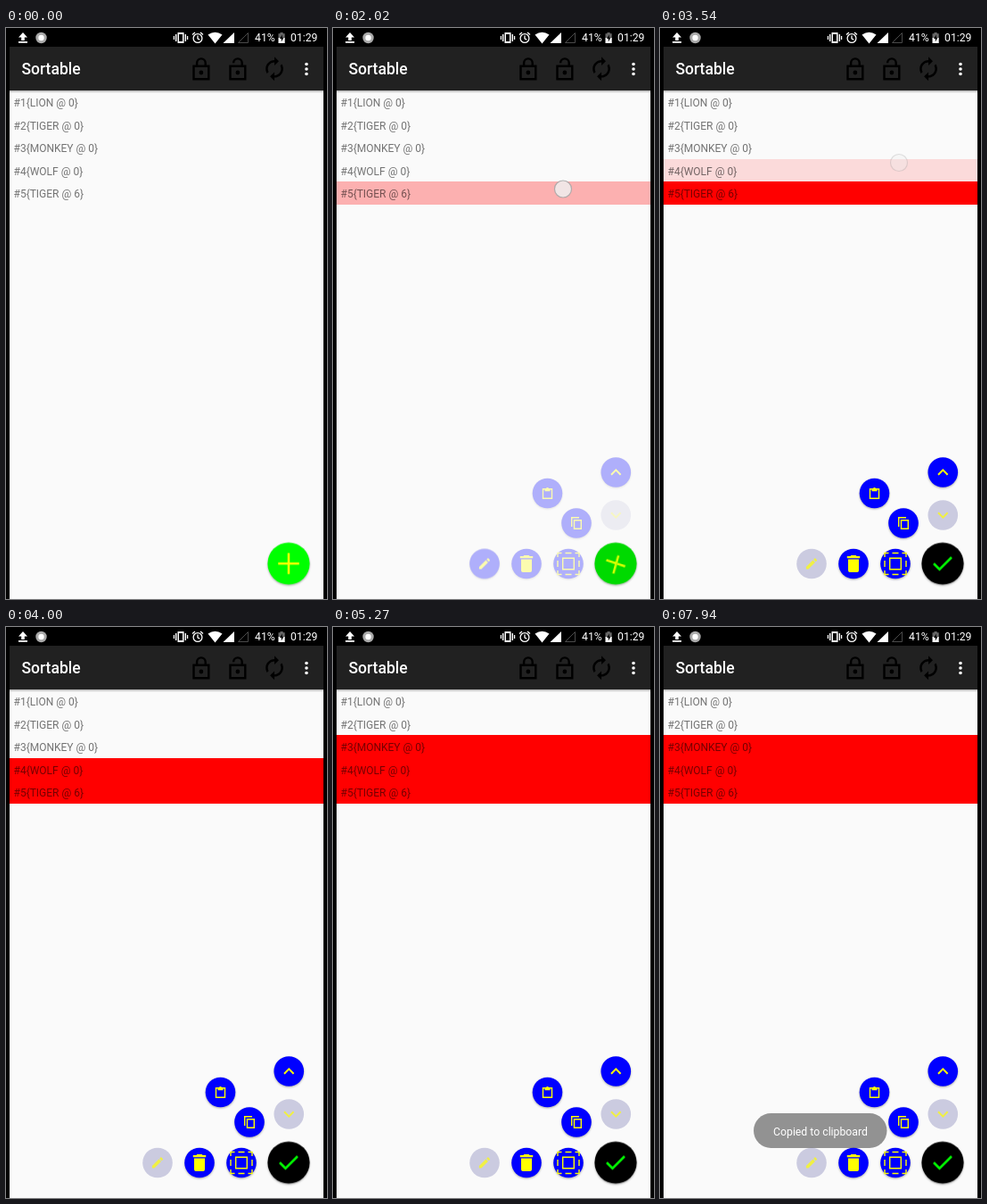
Recreate the animation shown at these times as an HTML page. Size 360x640 px, loop 8 s.

```html
<!DOCTYPE html>
<html lang="en">
<head>
<meta charset="utf-8">
<title>Sortable list</title>
<style>
html, body { margin: 0; width: 100%; height: 100%; overflow: hidden; background: #000; }
svg { display: block; width: 360px; height: 640px; font-family: Roboto, "Noto Sans", sans-serif; }
.anim { animation: 8s cubic-bezier(.37, 0, .63, 1) infinite both; }
.linear { animation-timing-function: linear; }
.label { font-size: 12px; fill: rgba(0, 0, 0, .54); }
.status { font-size: 12.25px; fill: #fff; }
.icon { fill: #ff0; }
.line { fill: none; stroke: #ff0; stroke-width: 2; }
.line.thin { stroke-width: 1.4; }
.off { fill: #cbcbe0; }
.button { fill: #00f; }
.raised { filter: drop-shadow(0 1px 1px rgba(0, 0, 0, .32)); }
.touch { fill: rgba(238, 238, 238, .85); stroke: rgba(165, 165, 165, .85); stroke-width: 1.2; }

/* 1% = 80 ms */
#row5 { animation-name: row5; }
#row4 { animation-name: row4; }
#row3 { animation-name: row3; }
@keyframes row5 { 0%, 21.75% { opacity: 0 } 31.25%, 100% { opacity: 1 } }
@keyframes row4 { 0%, 42.5% { opacity: 0 } 50%, 100% { opacity: 1 } }
@keyframes row3 { 0%, 55% { opacity: 0 } 63.9%, 100% { opacity: 1 } }

#menu { animation-name: row5; }
#edit { animation-name: edit; }
@keyframes edit { 0%, 42.5% { opacity: 1 } 43.75%, 100% { opacity: 0 } }

#fab { animation-name: fab; }
#turn { animation-name: turn; }
#glyph { animation-name: glyph; fill: none; }
@keyframes fab { 0%, 21.75% { fill: #0f0 } 35.75%, 100% { fill: #000 } }
@keyframes turn { 0%, 21.75% { transform: rotate(-90deg) } 35.75%, 100% { transform: rotate(0deg) } }
@keyframes glyph {
  0%, 21.75% { d: path("M-11.7 0L11.7 0M0 11.7L0 -11.7"); stroke: #ff0; stroke-width: 2.5px }
  35.75%, 100% { d: path("M-10 0L-3.5 6.5M-4.4 7.4L10 -7"); stroke: #0f0; stroke-width: 2.7px }
}

#hold { animation-name: hold; }
#tap4 { animation-name: tap4; }
#tap3 { animation-name: tap3; }
#tapCopy { animation-name: tapCopy; }
#ripple { animation-name: ripple; }
@keyframes hold { 0%, 13.74% { opacity: 0 } 13.75%, 31.25% { opacity: 1 } 33.5%, 100% { opacity: 0 } }
@keyframes tap4 { 0%, 42.49% { opacity: 0 } 42.5%, 43.5% { opacity: 1 } 44.75%, 100% { opacity: 0 } }
@keyframes tap3 { 0%, 53.86% { opacity: 0 } 53.87%, 55% { opacity: 1 } 56.5%, 100% { opacity: 0 } }
@keyframes tapCopy { 0%, 86.36% { opacity: 0 } 86.37%, 88.5% { opacity: 1 } 90.5%, 100% { opacity: 0 } }
@keyframes ripple {
  0%, 86.37% { opacity: 0; transform: scale(.3) }
  88.5% { opacity: .25; transform: scale(1) }
  95.75%, 100% { opacity: 0; transform: scale(1) }
}
#toast { animation-name: toast; }
@keyframes toast { 0%, 96.75% { opacity: 0 } 99.25%, 100% { opacity: 1 } }
</style>
</head>
<body>
<svg viewBox="0 0 360 640">
  <defs>
    <linearGradient id="shade" x2="0" y2="1">
      <stop stop-opacity=".3"/><stop offset="1" stop-opacity="0"/>
    </linearGradient>
    <path id="pencil" d="M3 17.2V21h3.8L17.8 9.9l-3.7-3.7zM20.7 7a1 1 0 0 0 0-1.4l-2.3-2.3a1 1 0 0 0-1.4 0l-1.8 1.8 3.7 3.7z"/>
    <path id="body" d="M5 9H19V21H5Z"/>
    <path id="side" d="M-12-7.500V-12H-7.500M-3.500-12H3.500"/>
  </defs>

  <rect x="4" y="21" width="352" height="619" fill="#fafafa"/>
  <rect x="4" y="21" width="352" height="49" fill="#212121"/>
  <rect x="4" y="70" width="352" height="3" fill="url(#shade)"/>

  <!-- status bar -->
  <g fill="#fff">
    <path d="M19 5l5 5.500h-3.200V14h-3.600v-3.500H14zM14 15h10v1.800H14z"/>
    <circle cx="39.500" cy="11" r="6.200" fill="#aaa"/>
    <circle cx="39.500" cy="11" r="3.200"/>
    <path d="M192.500 5h7v12h-7zM190 7h1.400v8H190zM200.600 7h1.400v8h-1.400zM187.800 9h1.300v4h-1.300zM202.900 9h1.300v4h-1.300z"/>
    <rect x="194" y="7" width="4" height="8" fill="#000"/>
    <path d="M234.500 17.500L226.500 7.500Q234.500 2 242.500 7.500zM256 5v12h-12.500z"/>
    <path d="M271.500 5.500v11h-11z" fill="none" stroke="#4a4a4a"/>
    <path d="M305.500 6.200h2V5h3.200v1.200h2V11h-7.200z" fill="#666"/>
    <path d="M305.500 11h7.200v6h-7.200z"/>
    <path d="M309.800 7.500l-2.800 4.500h1.800v3.500l2.700-4.700h-1.700z" fill="#000"/>
  </g>
  <g fill="none" stroke="#fff" stroke-width="1.300">
    <circle cx="215" cy="11.500" r="4.900"/>
    <path d="M215 8.500v3.300l2.300 1.400M209 7.600l3-2.600M221 7.600l-3-2.600"/>
  </g>
  <text class="status" x="279" y="15">41%</text>
  <text class="status" x="319" y="15">01:29</text>

  <!-- toolbar -->
  <text x="17.500" y="52" font-size="17.500" font-weight="500" fill="#fff">Sortable</text>
  <g fill="none" stroke="#000" stroke-width="2">
    <g transform="translate(204.500 32) scale(1.2)">
      <use href="#body"/><path d="M8 9V6a4 4 0 0 1 8 0V9"/><circle cx="12" cy="15" r="1"/>
    </g>
    <g transform="translate(245.500 32) scale(1.2)">
      <use href="#body"/><path d="M8 6a4 4 0 0 1 8 0V9"/><circle cx="12" cy="15" r="1"/>
    </g>
  </g>
  <path transform="translate(286.300 31) scale(1.23)" d="M12 6v3l4-4-4-4v3c-4.400 0-8 3.600-8 8 0 1.600.5 3 1.200 4.300l1.500-1.500c-.5-.8-.7-1.800-.7-2.800 0-3.300 2.700-6 6-6zm6.800 1.700l-1.500 1.500c.4.800.7 1.800.7 2.800 0 3.300-2.700 6-6 6v-3l-4 4 4 4v-3c4.400 0 8-3.600 8-8 0-1.600-.5-3-1.200-4.300z"/>
  <g fill="#fff">
    <circle cx="337" cy="40.500" r="1.800"/><circle cx="337" cy="46" r="1.800"/><circle cx="337" cy="51.500" r="1.800"/>
  </g>

  <!-- list -->
  <g fill="#f00">
    <rect id="row3" class="anim" x="4" y="121" width="352" height="26"/>
    <rect id="row4" class="anim" x="4" y="147" width="352" height="25"/>
    <rect id="row5" class="anim" x="4" y="172" width="352" height="26"/>
  </g>
  <g class="label">
    <text x="8.500" y="88">#1{LION @ 0}</text>
    <text x="8.500" y="113.500">#2{TIGER @ 0}</text>
    <text x="8.500" y="139">#3{MONKEY @ 0}</text>
    <text x="8.500" y="164.500">#4{WOLF @ 0}</text>
    <text x="8.500" y="190">#5{TIGER @ 6}</text>
  </g>

  <!-- action buttons -->
  <g id="menu" class="anim">
    <g transform="translate(317.300 498)">
      <circle class="button raised" r="16.800"/>
      <path class="line" d="M-5.300 2.700L0-2.600 5.300 2.700"/>
    </g>
    <g transform="translate(317.300 546)">
      <circle class="off" r="16.800"/>
      <path class="line" opacity=".7" d="M-5.300-2.700L0 2.600 5.300-2.700"/>
    </g>
    <g transform="translate(240.500 521.500)">
      <circle class="button raised" r="16.800"/>
      <path class="line thin" d="M-5-4.800H5V5.800H-5z"/>
      <path class="icon" d="M-3-5.500h1.500a1.600 1.600 0 0 1 3 0H3v3.200H-3z"/>
    </g>
    <g transform="translate(273 555)">
      <circle class="button raised" r="16.800"/>
      <path class="line thin" d="M-2.500-3.300H5.300V6.200H-2.500zM-5.300 4V-6.300H3"/>
      <circle id="ripple" class="anim" r="16.800" fill="#fff"/>
    </g>
    <g transform="translate(170 600.500)">
      <circle class="off" r="16.800"/>
      <use class="icon" href="#pencil" opacity=".7" transform="scale(.68) translate(-12 -12)"/>
      <g id="edit" class="anim">
        <circle class="button raised" r="16.800"/>
        <use class="icon" href="#pencil" transform="scale(.68) translate(-12 -12)"/>
      </g>
    </g>
    <g transform="translate(217 600.500)">
      <circle class="button raised" r="16.800"/>
      <path class="icon" d="M-6-5H6V7.500a2 2 0 0 1-2 2H-4a2 2 0 0 1-2-2zM-7.200-8.500h3.600l1-1h5.200l1 1h3.600v2.200H-7.200z"/>
    </g>
    <g transform="translate(264 600.500)">
      <circle class="button raised" r="16.800"/>
      <g class="line thin">
        <path d="M-6.300-6.300H6.300V6.300H-6.300z"/>
        <use href="#side"/>
        <use href="#side" transform="rotate(90)"/>
        <use href="#side" transform="rotate(180)"/>
        <use href="#side" transform="rotate(270)"/>
      </g>
    </g>
  </g>

  <g transform="translate(317 600.300)">
    <g class="raised"><circle id="fab" class="anim" r="23.600" fill="#0f0"/></g>
    <g id="turn" class="anim"><path id="glyph" class="anim" d="M-11.700 0L11.700 0M0 11.700L0 -11.700"/></g>
  </g>

  <g id="toast" class="anim linear">
    <rect x="105" y="545" width="149.500" height="39" rx="19.500" fill="rgba(20,20,20,.45)"/>
    <text x="180" y="570" text-anchor="middle" font-size="12.250" fill="#fff">Copied to clipboard</text>
  </g>

  <g class="touch">
    <circle id="hold" class="anim linear" cx="258" cy="180.500" r="9.500"/>
    <circle id="tap4" class="anim linear" cx="268" cy="151" r="9.500"/>
    <circle id="tap3" class="anim linear" cx="268" cy="132" r="9.500"/>
    <circle id="tapCopy" class="anim linear" cx="274" cy="554" r="9.500"/>
  </g>
</svg>
</body>
</html>
```
